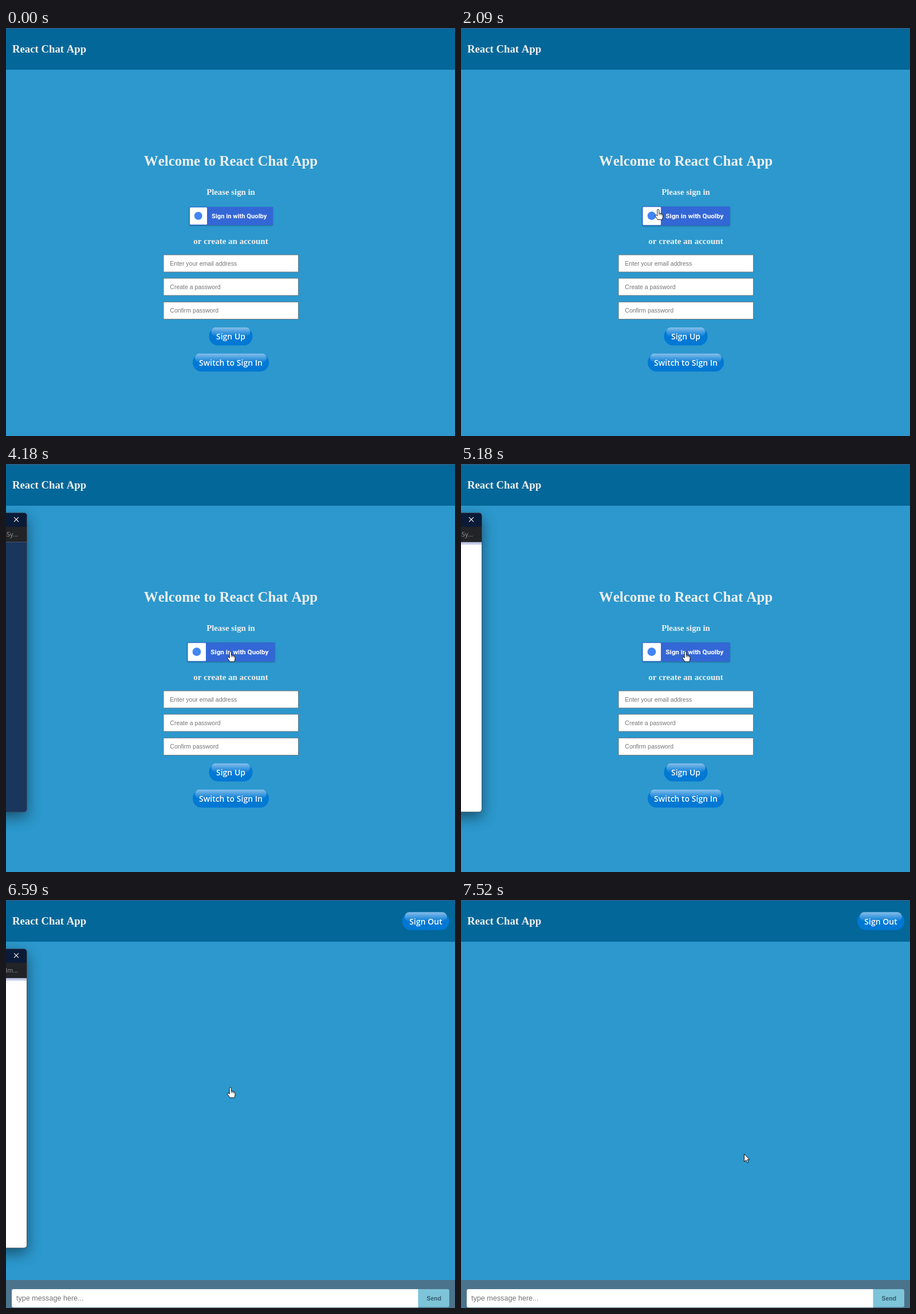
These frames come from a looping animation (784x714 px, 8 s). An HTML page:

```html
<!DOCTYPE html>
<html lang="en">
<head>
<meta charset="utf-8">
<title>React Chat App</title>
<style>
html, body { margin: 0; width: 100%; height: 100%; overflow: hidden; background: #2c98cd; }
svg { display: block; width: 784px; height: 714px; }
text { white-space: pre; }
.serif { font-family: "Liberation Serif", "Times New Roman", serif; font-weight: 700; font-kerning: none; fill: #f0f0f0; }
.sans { font-family: "Liberation Sans", Arial, sans-serif; fill: #757575; }
.pill text { font: 600 14px "Open Sans", "Noto Sans", sans-serif; fill: #fff; text-anchor: middle; }
.mid { text-anchor: middle; }
#brand { transform-origin: 393px 329px; }
#brand text { font: 700 11.2px Roboto, sans-serif; fill: #fff; }
#brand .box { filter: drop-shadow(0 1px 1px rgba(0,0,0,.3)); }
#popup { transform-origin: -224px 347px; filter: drop-shadow(0 9px 12px rgba(0,0,0,.45)); }
#address { font: 11px "Open Sans", "Noto Sans", sans-serif; fill: #999b9f; text-anchor: end; }
</style>
</head>
<body>
<svg viewBox="0 0 784 714" xmlns="http://www.w3.org/2000/svg">
  <defs>
    <linearGradient id="gloss" x2="0" y2="1">
      <stop offset="0" stop-color="#fff" stop-opacity=".52"/>
      <stop offset="1" stop-color="#fff" stop-opacity=".02"/>
    </linearGradient>
    <clipPath id="frame"><rect x="-485" y="85.5" width="521.5" height="523.5" rx="5"/></clipPath>
  </defs>
  <rect width="784" height="714" fill="#2c98cd"/>
  <rect width="784" height="73" fill="#046799"/>
  <rect width="784" height="1.5" fill="#315f8a"/>
  <text class="serif" x="11" y="43" font-size="18.75">React Chat App</text>

  <g id="login">
    <text class="serif mid" x="392.5" y="241" font-size="24.95">Welcome to React Chat App</text>
    <text class="serif mid" x="392.5" y="291.5" font-size="14.8">Please sign in</text>
    <g id="brand">
      <rect class="box" x="320" y="313" width="146" height="32" rx="1" fill="#3467d6"/>
      <rect x="321" y="314" width="30" height="30" rx="1" fill="#fff"/>
      <circle cx="335.7" cy="328.7" r="7" fill="#4285f4"/>
      <text x="359" y="332.7">Sign in with Quolby</text>
    </g>
    <text class="serif mid" x="392.5" y="377.5" font-size="15">or create an account</text>
    <g id="fields"></g>
    <g id="loginButtons"></g>
  </g>

  <g id="chat">
    <g id="chatButtons"></g>
    <rect y="665" width="784" height="49" fill="#4b738c"/>
    <path d="M720 681H13a3 3 0 0 0-3 3V710a3 3 0 0 0 3 3H720z" fill="#fff"/>
    <path d="M719.5 681H771a3 3 0 0 1 3 3V709.500a3 3 0 0 1-3 3H719.500z" fill="#7dc4d9"/>
    <text class="sans" x="18" y="701" font-size="12.6">type message here...</text>
    <text class="sans mid" x="747.3" y="700.6" font-size="10.4" font-weight="700" style="fill:#345a6e">Send</text>
  </g>

  <g id="popup">
    <g clip-path="url(#frame)">
      <rect id="page" x="-485" y="85" width="522" height="525"/>
      <g id="chrome">
        <rect x="-485" y="85" width="522" height="25.500" fill="#0a1b38"/>
        <rect x="-485" y="110" width="522" height="26.500" fill="#222326"/>
        <path d="M-485 136.500H37" stroke="#4b5566"/>
        <path d="M14 93.200l8 8m0-8l-8 8" stroke="#fff" stroke-width="1.100"/>
        <text id="address" x="21" y="127"></text>
      </g>
      <rect id="strip" x="-485" y="137" width="522" height="4" fill="#c3c9e6"/>
    </g>
    <rect x="-485" y="85.500" width="521.500" height="523.500" rx="5" fill="none" stroke="#3c4c5e" stroke-width=".9"/>
  </g>

  <g id="cursor" stroke="#000" stroke-linejoin="round">
    <path id="arrow" fill="#fff" stroke-width=".9" d="M0 0V13.500L3.200 10.600 5.300 15.400 7.400 14.500 5.400 9.800H9.300z"/>
    <path id="beam" fill="none" stroke="#333" d="M-3 -7.500H3M0 -7.500V7.500M-3 7.500H3"/>
    <g id="hand" stroke-width=".9">
      <path fill="#fff" d="M-1.800 2a1.600 1.600 0 0 1 3.200 0V6.800L5.400 7.800Q8 8.400 8 11V13.500Q8 15.500 6.600 18.500H-1.200Q-2.500 16-5.300 12.500-5.600 10.400-4.200 10.200-3.200 10.200-1.800 12z"/>
      <path fill="none" stroke-width=".7" d="M1.400 6.800V10.500M3.700 7.400V10.700M5.900 8.200V11"/>
    </g>
  </g>
</svg>
<script>
const $ = id => document.getElementById(id);
const LOOP = 8000;

const field = (y, label) => `
  <rect x="275" y="${y}" width="235.500" height="30" fill="#fff" stroke="#6d7880"/>
  <text class="sans" x="286.300" y="${y + 18.5}" font-size="10.520">${label}</text>`;

const pill = (x, y, w, label) => `<g class="pill">
  <rect x="${x}" y="${y}" width="${w}" height="31.500" rx="15.700" fill="#0078d4"/>
  <rect x="${x + 4}" y="${y}" width="${w - 8}" height="16" rx="8" fill="url(#gloss)"/>
  <text x="${x + w / 2}" y="${y + 21.3}">${label}</text></g>`;

$('fields').innerHTML = field(397, 'Enter your email address') +
  field(438, 'Create a password') + field(479.5, 'Confirm password');
$('loginButtons').innerHTML = pill(354.5, 524, 76, 'Sign Up') + pill(326, 569.8, 133, 'Switch to Sign In');
$('chatButtons').innerHTML = pill(692, 21.3, 82, 'Sign Out');

// Pointer moves: evenly spaced hard steps from start to end
const moves = [
  { start: 570, end: 1330, path: [[750, 702], [731, 652], [707, 595], [688, 532], [656, 460], [630, 405],
    [608, 358], [605, 342], [612, 334], [619, 331], [625, 330], [628, 330]] },
  { start: 1530, end: 2300, path: [[622, 322], [600, 296], [568, 268], [536, 243], [487, 233], [400, 235],
    [375, 250], [350, 290], [344.5, 317], [355, 322], [370, 326], [384, 327.5]] },
  { start: 2370, end: 2370, path: [[391, 327.5]] },
  { start: 2960, end: 3030, path: [[388, 318], [392, 327.5]] },
  { start: 7130, end: 7520, path: [[396, 335], [411, 353], [435, 382], [462, 412], [484, 435], [494.5, 444.5]] }
];

// Pointer shape by time
const shapes = [[0, ''], [570, 'arrow'], [1810, 'beam'], [1950, 'arrow'], [2020, 'beam'], [2090, 'hand'], [7130, 'arrow']];

// Popup: time, scale, opacity
const poses = [[0, 1, 0], [3310, .9, .3], [3380, .932, .75], [3450, .954, 1], [3520, .982, 1], [3590, 1, 1],
  [6660, .965, .6], [6720, .93, .22], [6790, .9, 0]];

// Popup content: time, page colour, toolbar, address, strip
const pages = [[0, '#fff', 0, '', 0], [3590, '#fff', 1, '', 0], [4180, '#1a365d', 1, 'aSy...', 0],
  [4380, '#f4f6f9', 1, 'aSy...', 0], [4520, '#fff', 1, 'aSy...', 0], [5180, '#fff', 1, 'aSy...', 1],
  [5970, '#fff', 1, 'dm...', 0], [6050, '#fff', 1, 'dm...', 1]];

const at = (table, t) => table.findLast(row => row[0] <= t);
const show = (id, on) => { $(id).style.display = on ? '' : 'none'; };

function pointer(t) {
  const m = moves.findLast(move => move.start <= t);
  if (!m) return [0, 0];
  const last = m.path.length - 1;
  const step = last ? (m.end - m.start) / last : 1;
  return m.path[Math.min(last, Math.floor((t - m.start) / step + .01))];
}

function draw(t) {
  show('login', t < 6590);
  show('chat', t >= 6590);
  $('brand').style.transform = `scale(${t >= 2090 ? 1.048 : 1})`;

  const [, scale, opacity] = at(poses, t);
  show('popup', opacity > 0);
  $('popup').style.transform = `scale(${scale})`;
  $('popup').style.opacity = opacity;

  const [, colour, toolbar, address, strip] = at(pages, t);
  $('page').setAttribute('fill', colour);
  $('address').textContent = address;
  show('chrome', toolbar);
  show('strip', strip);

  const shape = at(shapes, t)[1];
  for (const id of ['arrow', 'beam', 'hand']) show(id, id === shape);
  $('cursor').setAttribute('transform', `translate(${pointer(t)})`);
}

const begin = performance.now();
function tick() {
  draw((performance.now() - begin) % LOOP);
  requestAnimationFrame(tick);
}
tick();
</script>
</body>
</html>
```
